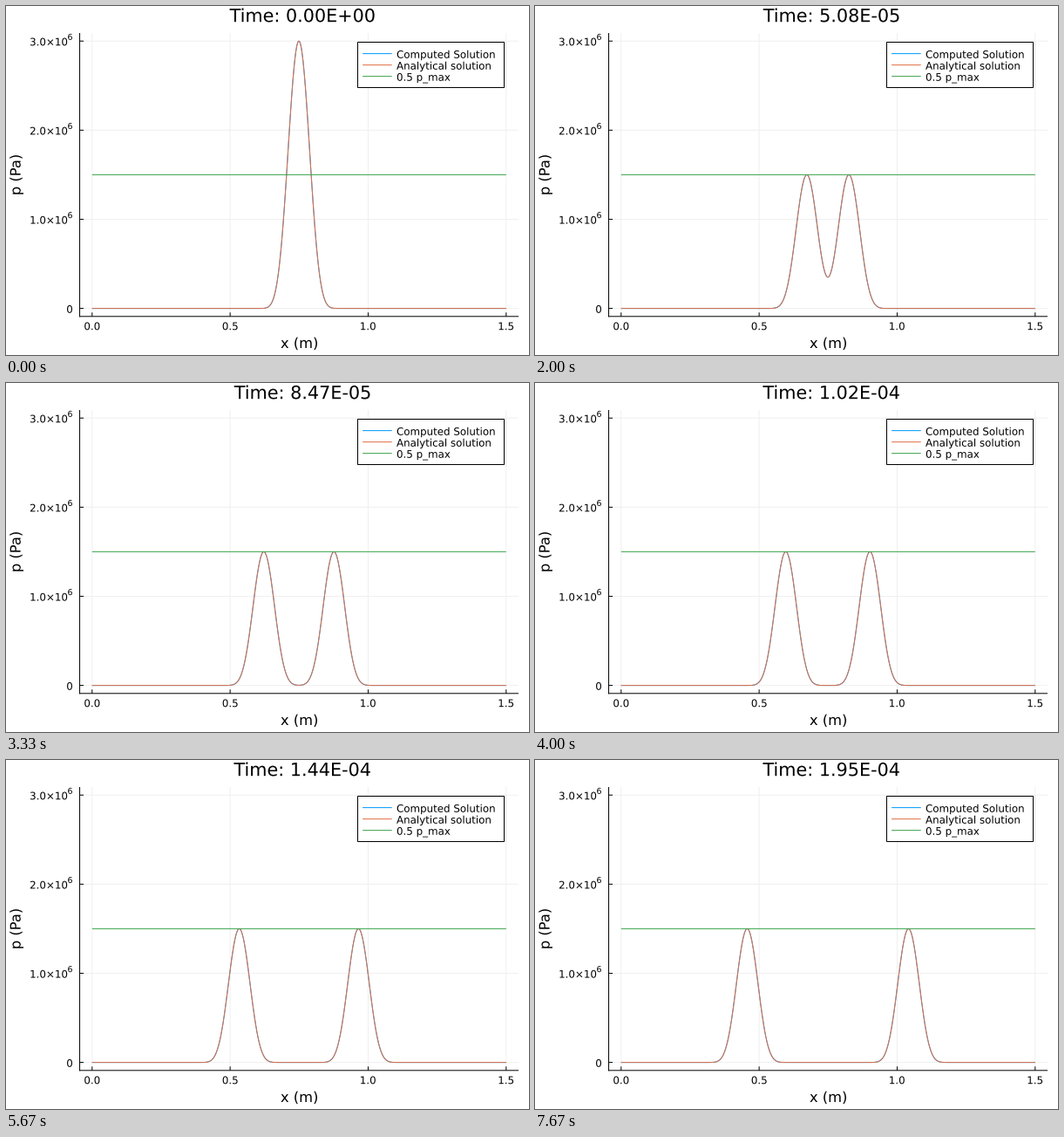
Recreate the animation shown at these times as a matplotlib script. Size 600x400 px, loop 8000 ms.

```python
import numpy as np
import matplotlib.pyplot as plt
from matplotlib.animation import FuncAnimation
from matplotlib.patches import PathPatch, Rectangle
from matplotlib.textpath import TextPath
from matplotlib.transforms import Affine2D

plt.rcParams["font.family"] = "DejaVu Sans"
plt.rcParams["path.simplify"] = False

WIDTH, HEIGHT, DPI = 600, 400, 100
STEPS, LOOP_MS, TICK_MS = 24, 8000, 20
PX = 72 / DPI  # points per pixel

BLUE, ORANGE, GREEN = "#009AFA", "#E26F46", "#3DA44D"
LEFT, RIGHT, TOP, BOTTOM = 84.55, 588, 31, 355.8
SMALL, MEDIUM, LARGE = (pt * 1.08 / 0.729 for pt in (8, 11, 14))
MIDDLE = 5.1  # from a small label's middle down to its baseline

P_MAX = 3e6          # Pa
SOUND_SPEED = 1500   # m/s
TIME_STEP = 8.47e-6  # s
CENTER, HALF_WIDTH = 0.749, 0.171

fig = plt.figure(figsize=(WIDTH / DPI, HEIGHT / DPI), dpi=DPI, facecolor="white")
ax = fig.add_axes([0, 0, 1, 1])
ax.set(xlim=(0, WIDTH), ylim=(HEIGHT, 0))
ax.axis("off")


def to_x(x):
    return 98.8 + x * 475 / 1.5


def to_y(p):
    return 346.6 - p * 306.4 / P_MAX


def line(xs, ys, color="black", **kwargs):
    return ax.plot(xs, ys, color=color, lw=PX, snap=False,
                   solid_capstyle="butt", **kwargs)[0]


def text_path(x, y, text, size, ha="center", angle=0):
    """Outline of text with its baseline at y, in pixels."""
    path = TextPath((0, 0), text, size=size)
    box = path.get_extents()
    shift = {"left": 0, "center": (box.x0 + box.x1) / 2, "right": box.x1}[ha]
    place = Affine2D().translate(-shift, 0).scale(1, -1).rotate_deg(-angle)
    return place.translate(x, y).transform_path(path)


def label(x, y, text, size=SMALL, ha="center", angle=0, zorder=2):
    path = text_path(x, y, text, size, ha, angle)
    return ax.add_patch(PathPatch(path, fc="black", lw=0, snap=False, zorder=zorder))


def pulse(distance):
    phase = np.clip(distance / HALF_WIDTH, -1, 1) * np.pi / 2
    return np.cos(phase) ** 8


def pressure(x, t):
    shift = SOUND_SPEED * t
    return P_MAX / 2 * (pulse(x - CENTER - shift) + pulse(x - CENTER + shift))


def draw_axes():
    for value in (0, 0.5, 1, 1.5):
        x = to_x(value)
        line([x, x], [TOP, BOTTOM], "#f0f0f0")
        line([x, x], [BOTTOM, BOTTOM - 4.5])
        label(x, 371.2, f"{value:.1f}")
    for millions in range(4):
        y = to_y(millions * 1e6)
        line([LEFT, RIGHT], [y, y], "#f0f0f0")
        line([LEFT, LEFT + 4.5], [y, y])
        if millions:
            label(27.1, y + MIDDLE, f"{millions}.0×10", ha="left")
            label(70.5, y - 1.4, "6", 9.4, ha="left")
        else:
            label(76, y + MIDDLE, "0", ha="right")
    line([LEFT, LEFT], [TOP, BOTTOM + 0.5])
    line([LEFT - 0.5, RIGHT], [BOTTOM, BOTTOM])
    label(336.2, 392, "x (m)", MEDIUM)
    label(16.6, 193.4, "p (Pa)", MEDIUM, angle=90)


def draw_legend():
    ax.add_patch(Rectangle((403.5, 41.5), 168, 52, fc="white", ec="black",
                           lw=PX, zorder=4, snap=False))
    entries = (("Computed Solution", BLUE), ("Analytical solution", ORANGE),
               ("0.5 p_max", GREEN))
    for row, (name, color) in enumerate(entries):
        y = 54.6 + 13 * row
        line([409.1, 442.7], [y, y], color, zorder=5)
        label(448, y + MIDDLE, name, ha="left", zorder=5)


draw_axes()
draw_legend()

grid = np.linspace(0, 1.5, 1001)
waves = [line([], [], color, zorder=3) for color in (BLUE, ORANGE)]
line(to_x(np.array([0, 1.5])), [to_y(P_MAX / 2)] * 2, GREEN, zorder=3)
title = label(339.6, 18.2, "Time: 0.00E+00", LARGE)


def update(frame):
    # The small lead makes each step start on the tick at or before its time.
    step = int((frame * TICK_MS + 13.5) * STEPS / LOOP_MS)
    t = step * TIME_STEP
    for wave in waves:
        wave.set_data(to_x(grid), to_y(pressure(grid, t)))
    title.set_path(text_path(339.6, 18.2, f"Time: {t:.2E}", LARGE))
    return [*waves, title]


anim = FuncAnimation(fig, update, frames=LOOP_MS // TICK_MS, interval=TICK_MS,
                     repeat=True, repeat_delay=0)
plt.show()
```
